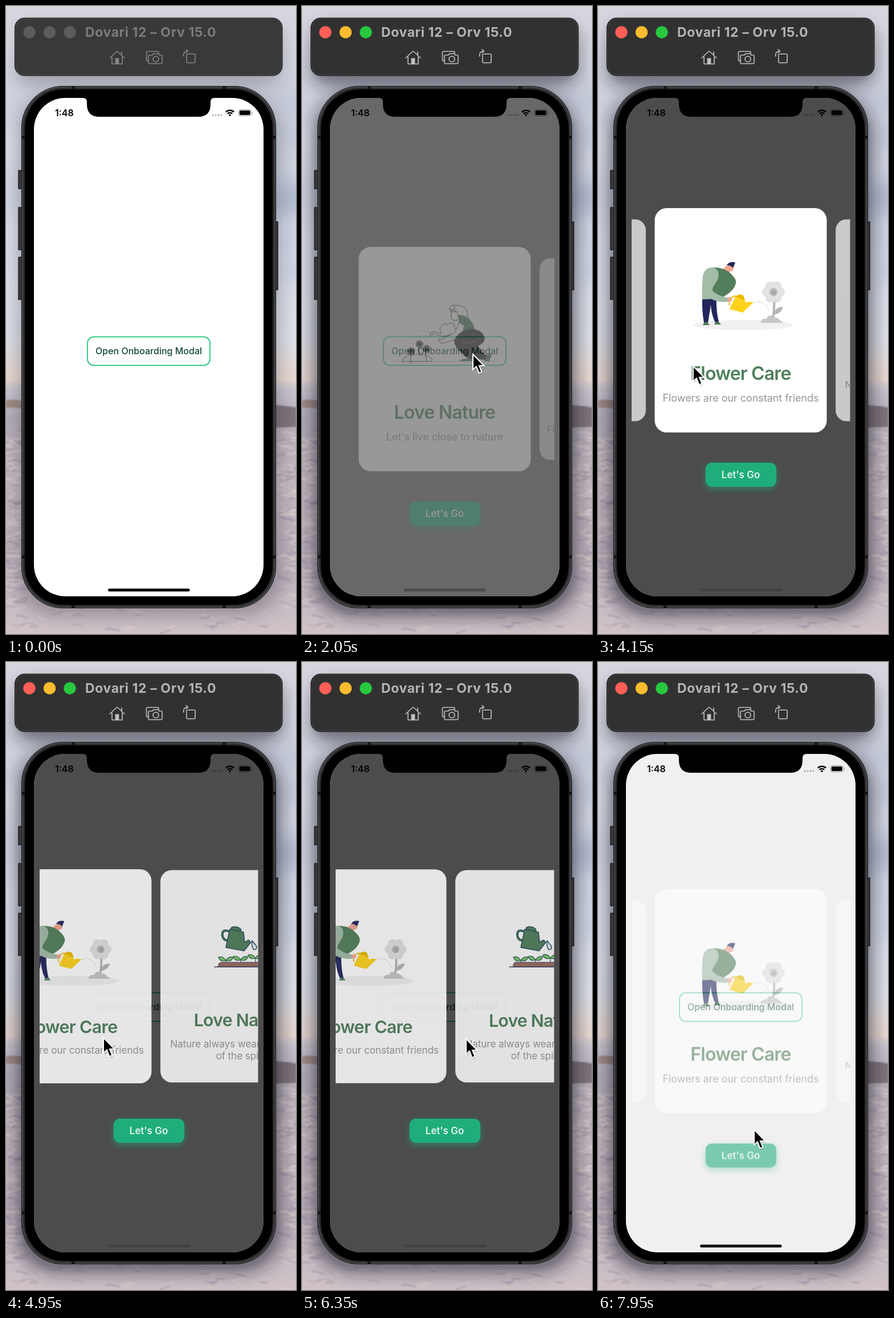
Animation, 509 px wide and 1100 px high, one loop 8000 ms. Source, as an HTML page:

```html
<!DOCTYPE html>
<html lang="en">
<head>
<meta charset="utf-8">
<title>Onboarding modal</title>
<style>
html, body { margin: 0; width: 100%; height: 100%; overflow: hidden; background: #cdd0de; }
svg { display: block; width: 100vw; height: 100vh; }
text { font-family: Inter, Roboto, sans-serif; }
.mid { text-anchor: middle; }
.title { font-size: 32px; font-weight: 600; letter-spacing: -.8px; fill: #4f7f5b; }
.sub { font-size: 18px; letter-spacing: -.05px; fill: #979797; }
.line { fill: none; stroke-linecap: round; stroke-linejoin: round; }
#bar { --face: #393939; --ink: #7c7c7c; --icon: #858585; --red: #5c5c5c; --amber: #5c5c5c; --green: #5c5c5c; }
#bar.active { --face: #313131; --ink: #b4b4b4; --icon: #c2c2c2; --red: #ff5f57; --amber: #febc2e; --green: #28c840; }
</style>
</head>
<body>
<svg viewBox="0 0 509 1100" preserveAspectRatio="none">
  <defs>
    <linearGradient id="scene" x2="0" y2="1">
      <stop offset="0" stop-color="#d6d6dd"/>
      <stop offset=".2" stop-color="#ced2df"/>
      <stop offset=".4" stop-color="#d8deea"/>
      <stop offset=".53" stop-color="#dfe1e8"/>
      <stop offset=".595" stop-color="#ead9d0"/>
      <stop offset=".608" stop-color="#cdc9d2"/>
      <stop offset=".66" stop-color="#b7afba"/>
      <stop offset=".75" stop-color="#c5b9c1"/>
      <stop offset=".9" stop-color="#bbb0bb"/>
      <stop offset="1" stop-color="#d0c4c9"/>
    </linearGradient>
    <linearGradient id="land">
      <stop offset="0" stop-color="#a39086"/>
      <stop offset="1" stop-color="#80747a"/>
    </linearGradient>
    <filter id="soft" x="-50%" y="-50%" width="200%" height="200%"><feGaussianBlur stdDeviation="16"/></filter>
    <filter id="haze" x="-50%" y="-50%" width="200%" height="200%"><feGaussianBlur stdDeviation="1.2"/></filter>
    <filter id="glow" x="-30%" y="-60%" width="160%" height="240%"><feGaussianBlur stdDeviation="6"/></filter>
    <clipPath id="screen"><rect x="49" y="161" width="403" height="873" rx="55"/></clipPath>
    <clipPath id="strip"><rect x="59" y="300" width="383.5" height="500"/></clipPath>
  </defs>

  <rect width="509" height="1100" fill="url(#scene)"/>
  <g id="clouds" filter="url(#soft)"></g>
  <path d="M0 690Q20 688 40 694L460 698Q490 700 509 703V737L440 740L40 706L0 703Z" fill="url(#land)" filter="url(#haze)"/>
  <g id="waves" class="line" filter="url(#haze)"></g>

  <g id="shadow" filter="url(#soft)">
    <rect x="20" y="152" width="461" height="916" rx="70" fill="#181828"/>
    <rect x="18" y="42" width="464" height="94" rx="17" fill="#181828"/>
  </g>

  <g id="bar">
    <rect x="15.5" y="21" width="469.5" height="101" rx="17" style="fill:var(--face)" stroke="#080808"/>
    <rect x="16.5" y="22" width="467.5" height="99" rx="16" fill="none" stroke="#fff" stroke-opacity=".14"/>
    <circle cx="41" cy="46" r="10.7" style="fill:var(--red)"/>
    <circle cx="76.5" cy="46" r="10.7" style="fill:var(--amber)"/>
    <circle cx="112" cy="46" r="10.7" style="fill:var(--green)"/>
    <text x="139" y="53.500" font-size="23" font-weight="700" letter-spacing=".6" style="fill:var(--ink)">Dovari 12 – Orv 15.0</text>
    <g class="line" style="stroke:var(--icon)" stroke-width="1.6">
      <path d="M182 91L195 79L208 91M186 89V101.500H204V89M203 86V80.500"/>
      <path d="M192.500 101V92H197.500V101Z" style="fill:var(--icon)"/>
      <path d="M250 96H248Q246.500 96 246.500 94V81.500Q246.500 79.500 248.500 79.500H266Q268 79.500 268 81.500V83"/>
      <path d="M253 86H257L259 83.500H267L269 86H272Q274 86 274 88V99Q274 101 272 101H252Q250 101 250 99V88Q250 86 253 86Z"/>
      <circle cx="263" cy="93" r="5"/>
      <rect x="317" y="84" width="15" height="15.500" rx="2"/>
      <path d="M311.500 88Q311 79 319 79M316 76L319.500 79L316 82"/>
    </g>
  </g>

  <g>
    <path d="M22 288h6v32h-6zM22 353h6v74h-6zM22 440h6v74h-6zM473 378h4v119h-4z" fill="#3a3a3c" stroke="#1c1c1e" stroke-width="1.500" stroke-linejoin="round"/>
    <rect x="27.500" y="140.500" width="446" height="914" rx="73" fill="#2d2d2f" stroke="#1a1a1c" stroke-width="1.200"/>
    <rect x="29" y="142" width="443" height="911" rx="71.500" fill="none" stroke="#505052" stroke-width="1.500"/>
    <path d="M28 230H34M467 230H473M28 965H34M467 965H473M118 141V147M383 141V147M118 1048V1054M383 1048V1054" stroke="#161617" stroke-width="6"/>
    <rect x="33" y="146" width="435" height="903" rx="68"/>
  </g>

  <g clip-path="url(#screen)">
    <rect x="49" y="161" width="403" height="873" fill="#fff"/>
    <text x="86" y="192.500" font-size="16" font-weight="600">1:48</text>
    <path class="line" d="M363 191H379" stroke="#b9b9b9" stroke-width="3.400" stroke-dasharray="0 5"/>
    <path d="M385.800 185.600A10.300 10.300 0 0 1 400.200 185.600M388.700 188.700A6.200 6.200 0 0 1 397.300 188.700" fill="none" stroke="#000" stroke-width="2.500"/>
    <path d="M390.600 190.800L393 193.300L395.400 190.800A3.500 3.500 0 0 0 390.600 190.800Z"/>
    <rect x="408" y="181.500" width="22.500" height="11" rx="3.300" fill="none" stroke="#999"/>
    <rect x="409.700" y="183" width="19" height="8" rx="2"/>
    <path d="M432 185Q434 187 432 189Z" fill="#999"/>
    <rect x="143" y="579.500" width="215" height="50" rx="11" fill="#fff" stroke="#36c988" stroke-width="2"/>
    <text class="mid" x="250.500" y="610" font-size="16" font-weight="500" fill="#12492f">Open Onboarding Modal</text>
    <rect id="shade" x="49" y="161" width="403" height="873"/>
    <g id="modal">
      <g id="cards" clip-path="url(#strip)"></g>
      <rect x="189" y="804" width="124" height="42" rx="11" fill="#1fae7b" opacity=".55" filter="url(#glow)"/>
      <rect x="189" y="800" width="124" height="42" rx="11" fill="#1fae7b"/>
      <text class="mid" x="250.500" y="827" font-size="17" font-weight="500" fill="#fff">Let's Go</text>
    </g>
    <rect id="home" x="179" y="1020.500" width="143.500" height="5" rx="2.500"/>
    <path d="M135 160V161Q142 161 142 168V172Q142 194 164 194H337Q359 194 359 172V168Q359 161 366 161V160Z"/>
  </g>

  <g id="cursor">
    <path d="M0 0V27L6 21.500L10.500 33L15.500 31L11 20H19.500Z" transform="translate(1 2)" opacity=".3" filter="url(#haze)"/>
    <path d="M0 0V27L6 21.500L10.500 33L15.500 31L11 20H19.500Z" stroke="#fff" stroke-width="2"/>
  </g>
</svg>

<script>
const $ = id => document.getElementById(id);
const clamp = v => Math.max(0, Math.min(1, v));
const LOOP = 8000, STEP = 50, GAP = 302.5, MID_X = 250.5, MID_Y = 550.5;

let seed = 7;
const rnd = (a, b) => a + (b - a) * ((seed = seed * 16807 % 2147483647) / 2147483647);
const repeat = (n, make) => Array.from({ length: n }, (_, i) => make(i)).join('');

$('clouds').innerHTML = repeat(16, i =>
  `<ellipse cx="${i % 2 * 509}" cy="${rnd(60, 560)}" rx="${rnd(20, 60)}" ry="${rnd(10, 28)}"
    fill="${i % 2 ? '#aab3cd' : '#e8e8ee'}" opacity=".4"/>`);
$('waves').innerHTML = repeat(260, i => {
  const y = rnd(745, 1100), x = y > 1050 ? rnd(-10, 509) : i % 2 ? rnd(468, 509) : rnd(-10, 25);
  return `<path d="M${x} ${y}q${rnd(5, 10)} ${rnd(-5, 5)} ${rnd(10, 24)} ${rnd(-6, 6)}"
    stroke="${i % 3 ? '#e6d9d8' : '#94889a'}" stroke-width="${rnd(1, 4)}" opacity=".45"/>`;
});

const bloom = (x, y) => `<path class="line" d="M${x} ${y}Q${x - 2} ${y + 8} ${x} ${y + 20}" stroke="#2a2a2a"/>
  <circle cx="${x}" cy="${y}" r="5" fill="#2a2a2a" stroke="#2a2a2a" stroke-width="3" stroke-dasharray="1.6 1"/>
  <circle cx="${x}" cy="${y}" r="4" fill="none" stroke="#fff" stroke-width=".6"/>`;
const petal = i => {
  const a = i * Math.PI / 3 + Math.PI / 6;
  return `<circle cx="${308 + 11.5 * Math.sin(a)}" cy="${501 + 11.5 * Math.cos(a)}" r="8.500" fill="#e2e2e2"/>`;
};
const sprout = (x, y) => `<path d="M${x} 527V${y}Q${x - 5} ${y - 9} ${x - 13} ${y - 6}Q${x - 10} ${y + 3} ${x} ${y}
  Q${x + 4} ${y - 8} ${x + 13} ${y - 6}Q${x + 10} ${y + 3} ${x} ${y}" fill="#7cc66c" stroke="#245a4c" stroke-width="1.200"/>`;

const gardener = `<g transform="scale(1.033) translate(-154 -550.5)">
  <path d="M70 554.500H240" stroke="#bbb" stroke-width=".8"/>
  <g class="line" stroke="#333" stroke-width=".9">
    <path fill="#fff" d="M82 554Q82 549 88 547Q92 541 99 544Q107 540 113 544Q120 541 125 546Q134 548 132 554Z"/>
    <path d="M131 507Q116 500 103 504M130 511Q118 508 108 515" stroke="#999" stroke-dasharray="2 4"/>
    <path style="fill:#fff" d="M146 499L150 492Q154 488 158 493Q164 486 169 491L174 506L152 512L146 511L135 507L131 512L129 507L135 504L147 507Z"/>
    <path style="fill:#fff" d="M165 471Q163 482 169 485L178 484L181 470Z"/>
    <path style="fill:#fff" d="M164 470C158 461 170 457 179 460C190 461 194 470 192 476C197 483 192 489 186 486C179 485 178 476 174 470C171 466 168 467 164 470Z"/>
    <circle cx="167" cy="463" r="4" style="fill:#fff"/>
  </g>
  ${bloom(97, 537)}${bloom(123, 533)}${bloom(111, 525)}
  <path fill="#4f7f5b" d="M176 477C189 472 203 487 205 500L185 506C177 497 180 486 176 477Z"/>
  <path class="line" style="fill:#fff" stroke="#333" stroke-width=".9" d="M178 488Q176 500 168 507L147 518L144 516L143 520L150 524L172 517Q186 510 187 494Z"/>
  <path fill="#2a2a2a" d="M185 503C202 495 221 502 222 516C221 525 211 529 203 530L205 549L197 552C186 544 171 531 170 521C172 512 178 507 185 503Z"/>
  <path fill="#2a2a2a" d="M196 526L210 526Q216 540 228 545L225 552Q208 552 200 545Z"/>
  <path class="line" stroke="#777" stroke-width=".8" d="M187 523Q204 525 213 514"/>
  <path fill="#4f7f5b" d="M179 554Q183 549 192 550L203 549V554ZM221 554L227 543L234 541L230 554Z"/>
</g>`;

const grower = `<g transform="translate(-250.5 -550.5)">
  <ellipse cx="255" cy="559" rx="87" ry="9" fill="#f1f1f1"/>
  <path fill="#23265c" d="M183 510H208Q207 534 212 553L206 555Q199 541 198 524L193 555H186Q182 532 183 510Z"/>
  <path fill="#4f7f5b" d="M184 559Q186 553 192 554L196 559ZM204 558L206 554L212 553L216 558Z"/>
  <path fill="#f3a590" d="M217 463L228 453L238 455L237 463L228 467Z"/>
  <path fill="#23265c" d="M226 454Q230 447 241 449L237 459Q233 454 226 454Z"/>
  <path fill="#527f5b" d="M193 460C208 455 222 460 230 466C238 473 243 479 242 485C239 500 224 507 212 514L184 513Z"/>
  <path fill="#a3bca8" d="M183 514C182 496 183 483 184 474C186 460 197 456 205 459C213 463 213 473 209 481C204 490 200 493 201 499Q212 509 230 511L230 518Q210 520 199 513Z"/>
  <path class="line" stroke="#e6bd10" stroke-width="2" d="M243 508Q228 508 231 524"/>
  <circle cx="231" cy="514" r="4" fill="#f3a590"/>
  <path fill="#ffd31a" d="M241 509L255 507L259 520L264 518L273 519L254 537L231 531Z"/>
  <path fill="#e9b800" d="M241 509L248 505L255 507L258 516Z"/>
  <path class="line" stroke="#ccc" stroke-dasharray="2 2" d="M274 519Q294 514 300 535"/>
  <path class="line" stroke="#b5b5b5" stroke-width="4" d="M309 512Q310 530 307 546"/>
  <path fill="#b5b5b5" d="M309 538Q312 527 325 527Q322 538 309 541Z"/>
  ${repeat(6, petal)}
  <circle cx="308" cy="501" r="7" fill="#b9b9b9"/>
  <circle cx="309" cy="502" r="4" fill="#a8a8a8"/>
  <path fill="#c6c6c6" d="M285 554Q288 546 296 548Q300 538 308 545Q316 545 320 551L326 555H288Z"/>
</g>`;

const plants = `<g transform="scale(1.057) translate(-414 -550.5)">
  ${sprout(386, 523)}${sprout(412, 522)}${sprout(438, 519)}
  <path fill="#9a6a60" stroke="#3d3f5c" d="M373 534V530Q374 526 379 526H450Q455 526 456 530V534Z"/>
  <path class="line" stroke="#3d3f5c" stroke-width="1.600" d="M366 534H462"/>
  <g class="line" stroke="#234b5c" stroke-width="1.500">
    <path d="M392 472Q379 467 380 479Q381 487 389 488" stroke-width="4"/>
    <path d="M392 472Q379 467 380 479Q381 487 389 488" stroke="#4f7f5b" stroke-width="1.500"/>
    <ellipse cx="404" cy="468" rx="9" ry="4" transform="rotate(12 404 468)" style="fill:#4f7f5b"/>
    <path style="fill:#4f7f5b" d="M393 468L417 473L419 491L426 487L430 491L418 506L386 500Z"/>
    <path style="fill:#e4eef3" d="M432 488Q431 500 435 504Q441 504 440 498Q437 494 432 488Z"/>
  </g>
</g>`;

const card = (art, titleY, title, ...subs) => `<g>
  <rect x="-151" y="-196.500" width="302" height="393" rx="21" fill="#fff"/>${art}
  <text class="mid title" y="${titleY}">${title}</text>
  ${subs.map((s, i) => `<text class="mid sub" y="${titleY + 38.5 + i * 22}">${s}</text>`).join('')}</g>`;
$('cards').innerHTML =
  card(gardener, 104, 'Love Nature', "Let's live close to nature") +
  card(grower, 104, 'Flower Care', 'Flowers are our constant friends') +
  card(plants, 93, 'Love Nature', 'Nature always wears the colors', 'of the spirit');

const lin = p => p, quadIn = p => p * p, quadOut = p => 1 - (1 - p) ** 2;
const inOut = p => p < .5 ? 2 * p * p : 1 - 2 * (1 - p) ** 2;

// time, cursor x, cursor y, carousel position, easing towards this key
const keys = [
  [0, 520, 700, 0, lin],
  [800, 520, 700, 0, lin],
  [1250, 300, 610, 0, inOut],
  [2350, 300, 610, 0, lin],
  [2800, 266, 622, 0, inOut],
  [3300, 169, 620, .319, quadIn],
  [3400, 126, 620, .461, lin],
  [4000, 126, 622, 1, quadOut],
  [4450, 310, 660, 1, inOut],
  [4950, 171, 658, 1.46, quadIn],
  [5050, 126, 657, 1.608, lin],
  [5650, 126, 657, 2, quadOut],
  [6000, 126, 657, 2, lin],
  [6350, 288, 660, 1.466, quadIn],
  [6450, 333, 660, 1.317, lin],
  [6950, 318, 690, 1, quadOut],
  [7400, 274, 819, 1, inOut],
  [LOOP, 274, 819, 1, lin]
];

function pose(t) {
  const i = keys.findIndex(k => k[0] > t), a = keys[i - 1], b = keys[i];
  const p = b[4]((t - a[0]) / (b[0] - a[0]));
  return [1, 2, 3].map(n => a[n] + (b[n] - a[n]) * p);
}

const OPEN = 1850, CLOSE = 7717;
const shown = (t, ms, ease) => ease(clamp((t - OPEN) / ms)) - ease(clamp((t - CLOSE) / ms));

function draw(t) {
  const [x, y, pos] = pose(t), active = t >= 1300;
  const shade = shown(t, 330, quadOut), modal = shown(t, 500, inOut);
  $('bar').classList.toggle('active', active);
  $('shadow').setAttribute('opacity', active ? .6 : .28);
  $('shade').setAttribute('opacity', .7 * shade);
  $('home').setAttribute('opacity', 1 - .85 * shade);
  $('modal').setAttribute('opacity', modal);
  $('modal').setAttribute('transform', `translate(0 ${100 * (1 - modal)})`);
  [...$('cards').children].forEach((el, i) => {
    const off = i - pos, far = clamp(Math.abs(off));
    el.setAttribute('transform', `translate(${MID_X + off * GAP} ${MID_Y}) scale(${1 - .1 * far})`);
    el.setAttribute('opacity', 1 - .3 * far);
  });
  $('cursor').setAttribute('transform', `translate(${x} ${y})`);
}

const start = performance.now();
function tick() {
  const t = (performance.now() - start) % LOOP;
  draw(Math.floor(t / STEP) * STEP);
  requestAnimationFrame(tick);
}
tick();
</script>
</body>
</html>
```
